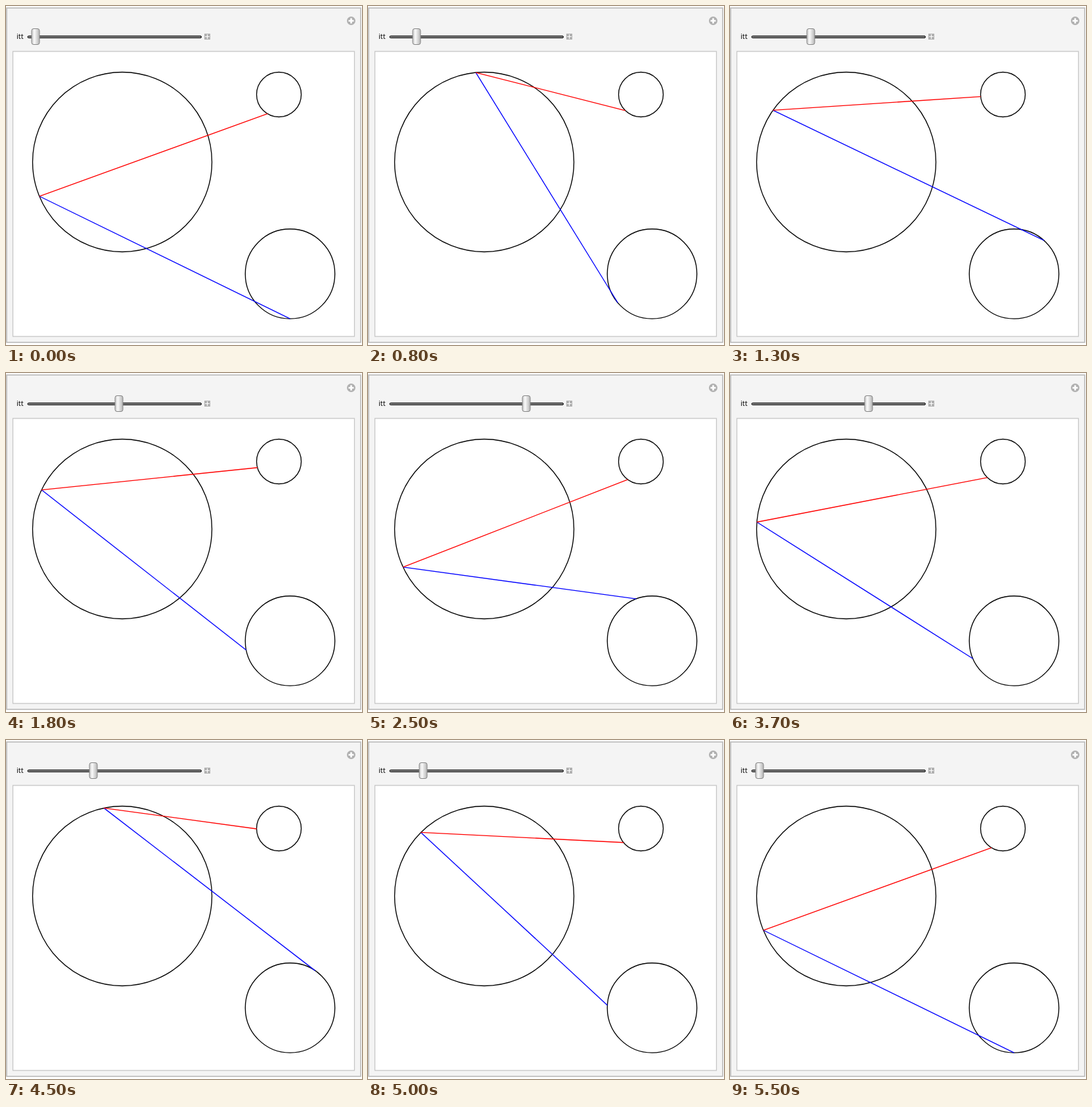
An HTML page that plays this animation: 542x515 px, repeating every 6000 ms.

```html
<!DOCTYPE html>
<html lang="en">
<head>
<meta charset="utf-8">
<title>Three coupled circles</title>
<style>
  html, body { margin: 0; width: 100%; height: 100%; overflow: hidden; background: #fff; }
  svg { display: block; }
  text { font: 11px "Open Sans", sans-serif; }
</style>
</head>
<body>
<svg width="542" height="515" viewBox="0 0 542 515">
  <defs>
    <linearGradient id="metal">
      <stop offset="0" stop-color="#c4c4c4"/>
      <stop offset=".35" stop-color="#fafafa"/>
      <stop offset="1" stop-color="#b4b4b4"/>
    </linearGradient>
  </defs>
  <rect x="1" y="3" width="539" height="508" fill="#f4f4f4" stroke="#bababa" stroke-width="1.6"/>
  <rect x="10.5" y="69" width="520" height="433" fill="#fff" stroke="#c6c6c6" stroke-width="1.3"/>

  <circle cx="525.5" cy="22.5" r="6.5" fill="#b0b0b0"/>
  <path d="M521.5 22.5h8M525.5 18.5v8" stroke="#fff" stroke-width="2.6"/>

  <text x="16" y="50">itt</text>
  <rect x="33" y="45.5" width="264.5" height="3" rx="1.5" fill="#8c8c8c" stroke="#000"/>
  <rect x="302" y="42" width="9" height="9" fill="#b0b0b0"/>
  <path d="M303 46.5h7M306.5 43v7" stroke="#fff" stroke-width="1.1"/>
  <rect id="thumb" x="-6" y="34.5" width="12" height="24" rx="3" fill="url(#metal)" stroke="#858585"/>

  <g id="rings" fill="none" stroke="#000" stroke-width="1.35"></g>
  <g stroke-width="1.35">
    <line id="blue" stroke="#00f"/>
    <line id="red" stroke="#f00"/>
  </g>
</svg>
<script>
const LOOP = 6000, STEP = 100, LAST = 25;

// Each ring carries one bead that swings smoothly through [iteration, degrees] keys.
const big = { x: 177, y: 237, r: 136.5, keys: [
  [0, 202.4], [4, 455.4], [7, 529], [10, 461.8], [13, 187],
  [14, 154.2], [18, -184.4], [21, -154.9], [25, 171]] };
const small = { x: 415.5, y: 134.5, r: 34, keys: [
  [0, 239.3], [4, 225.6], [10, 180.8], [14, 195.8], [18, 225.6], [21, 233.7], [25, 220]] };
const medium = { x: 432.5, y: 406.9, r: 68.2, keys: [
  [0, 270], [4, 220], [7, 77], [10, 56], [14, 191.9],
  [16, 234], [18, 203.4], [21, 110.8], [24, 60.4], [25, 67]] };

const byId = id => document.getElementById(id);
const setAttributes = (node, values) => {
  for (const name in values) node.setAttribute(name, values[name]);
};

for (const { x, y, r } of [big, small, medium]) {
  const ring = document.createElementNS("http://www.w3.org/2000/svg", "circle");
  setAttributes(ring, { cx: x, cy: y, r });
  byId("rings").append(ring);
}

// Slope at a key, taken across its neighbours; the motion starts at rest.
function slope(keys, k) {
  if (k === 0) return 0;
  const [t0, a0] = keys[k - 1], [t1, a1] = keys[Math.min(k + 1, keys.length - 1)];
  return (a1 - a0) / (t1 - t0);
}

// Cubic Hermite curve through the keys.
function angleAt(keys, i) {
  const k = Math.max(1, keys.findIndex(([t]) => t >= i));
  const [t0, a0] = keys[k - 1], [t1, a1] = keys[k];
  const span = t1 - t0, u = (i - t0) / span, v = 1 - u;
  return a0 * v * v * (1 + 2 * u) + a1 * u * u * (1 + 2 * v)
    + span * u * v * (v * slope(keys, k - 1) - u * slope(keys, k));
}

function bead({ x, y, r, keys }, i) {
  const a = angleAt(keys, i) * Math.PI / 180;
  return [x + r * Math.cos(a), y - r * Math.sin(a)];
}

function connect(id, [x1, y1], [x2, y2]) {
  setAttributes(byId(id), { x1, y1, x2, y2 });
}

// Hold at the start, step up, repeat the last iteration, step back down.
function iterationAt(time) {
  const end = 2 * LAST + 1;
  const step = Math.min(Math.max(Math.floor(time / STEP) - 4, 0), end);
  return Math.min(step, end - step);
}

function draw(now) {
  const i = iterationAt(now % LOOP);
  const hub = bead(big, i);
  connect("red", hub, bead(small, i));
  connect("blue", hub, bead(medium, i));
  const thumbX = Math.floor(45 + 9.8 * Math.max(i - 1, 0));
  byId("thumb").setAttribute("transform", `translate(${thumbX})`);
}

const start = performance.now();
function tick() {
  draw(performance.now() - start);
  requestAnimationFrame(tick);
}
tick();
</script>
</body>
</html>
```
